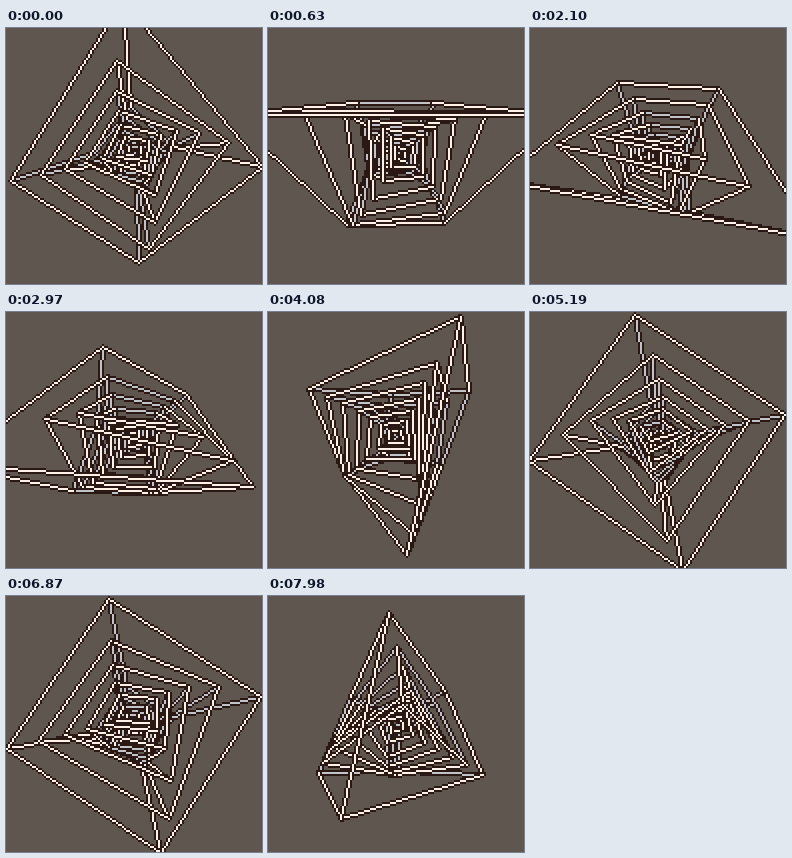
An HTML page with a canvas for the animation above (8 s loop, 256x256 px).

```html
<!DOCTYPE html>
<html lang="en">
<head>
<meta charset="utf-8">
<title>Nested cubes</title>
<style>
  html, body { margin: 0; width: 100%; height: 100%; overflow: hidden; background: #5f574f; }
  canvas { display: block; width: 100vw; height: 100vh; image-rendering: pixelated; }
</style>
</head>
<body>
<canvas id="stage" width="128" height="128"></canvas>
<script>
const ctx = document.getElementById('stage').getContext('2d');
const LOOP = 8000, STEP = 30;
const BACK = '#5f574f', SHADE = '#291814', NEAR = '#fff1e8', FAR = '#c2c3c7';
const FOCAL = 40, CAMERA = 1.875;
const LAYERS = 7, LAG = 3;
const RAD = Math.PI / 180;

// Corners 0-3 form one face, 4-7 the opposite one.
const EDGES = [];
for (let k = 0; k < 4; k++) {
  const next = (k + 1) % 4;
  EDGES.push([k, next], [k + 4, next + 4], [k, k + 4]);
}

// Spin about z, then tilt about x, then project.
function corners(size, tick) {
  const tilt = (-12 + 3.2 * tick) * RAD;
  const spin = (-3.6 - 2 * tick) * RAD;
  const c = Math.cos(tilt), s = Math.sin(tilt);
  return Array.from({ length: 8 }, (_, i) => {
    const a = spin + (i % 4) * Math.PI / 2;
    const x = Math.SQRT2 * Math.cos(a), y = Math.SQRT2 * Math.sin(a);
    const z = i < 4 ? 1 : -1;
    const depth = size * (y * s + z * c);
    const scale = FOCAL * size / (CAMERA - depth);
    return {
      x: Math.floor(64 + x * scale),
      y: Math.floor(64 + (y * c - z * s) * scale),
      z: depth
    };
  });
}

// Hard-edged line, one pixel per step along the longer axis.
function pixels(a, b) {
  const n = Math.max(Math.abs(b.x - a.x), Math.abs(b.y - a.y), 1);
  return Array.from({ length: n + 1 }, (_, i) => [
    Math.round(a.x + (b.x - a.x) * i / n),
    Math.round(a.y + (b.y - a.y) * i / n)
  ]);
}

// A light core with a dark outline on all four sides.
function outlined(a, b, color) {
  const path = pixels(a, b);
  ctx.fillStyle = SHADE;
  for (const [x, y] of path) {
    ctx.fillRect(x - 1, y, 3, 1);
    ctx.fillRect(x, y - 1, 1, 3);
  }
  ctx.fillStyle = color;
  for (const [x, y] of path) ctx.fillRect(x, y, 1, 1);
}

function draw(tick) {
  ctx.fillStyle = BACK;
  ctx.fillRect(0, 0, 128, 128);
  const lines = [];
  for (let i = 0; i < LAYERS; i++) {
    const pts = corners(1 - i / LAYERS, tick + LAG * i);
    for (const [p, q] of EDGES) {
      lines.push({ a: pts[p], b: pts[q], z: pts[p].z + pts[q].z });
    }
  }
  lines.sort((m, n) => m.z - n.z);
  for (const { a, b, z } of lines) outlined(a, b, z > 0 ? NEAR : FAR);
}

const start = performance.now();
let shown = -1;
function frame() {
  const tick = Math.floor(((performance.now() - start) % LOOP) / STEP);
  if (tick !== shown) draw(shown = tick);
  requestAnimationFrame(frame);
}
frame();
</script>
</body>
</html>
```
